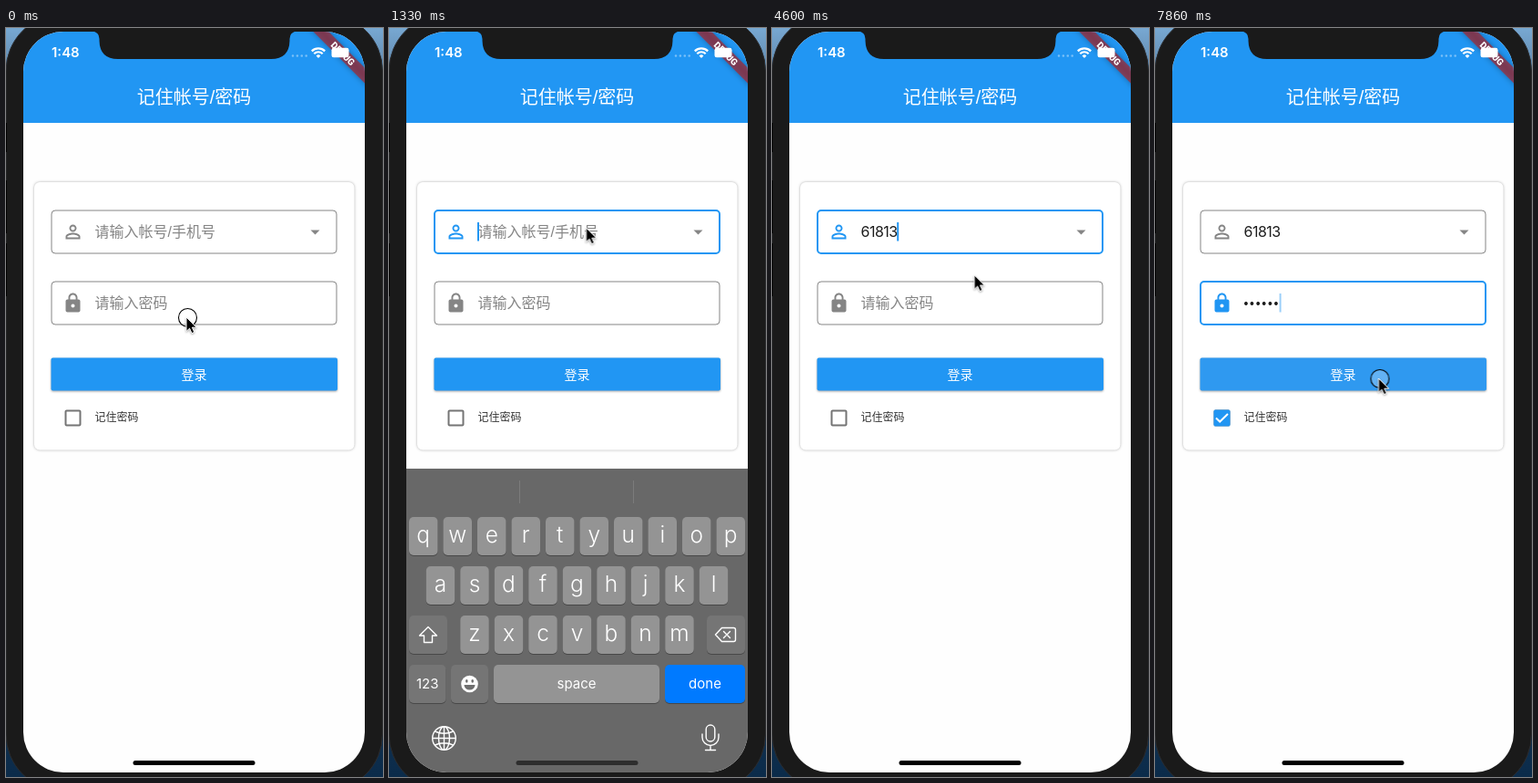
Recreate the animation shown at these times as an HTML page. Size 414 by 821 pixels, loop 8 s.

```html
<!DOCTYPE html>
<html lang="zh-CN">
<head>
<meta charset="utf-8">
<title>Login form</title>
<style>
  html, body { margin: 0; width: 100%; height: 100%; overflow: hidden; background: #1a1a1a; }
  svg { display: block; width: 414px; height: 821px; }
  text { font-family: "Liberation Sans", "Noto Sans CJK SC", "Noto Sans CJK", sans-serif; }
  .latin, .latin text { font-family: Inter, Roboto, sans-serif; }
  .mid { text-anchor: middle; }
  .hint { font-size: 16px; fill: #858585; }
  .typed { font-size: 16px; letter-spacing: -.5px; fill: #1c1c1c; }
  .typed .dots { font-family: "Liberation Sans", sans-serif; font-size: 14px; letter-spacing: 1.7px; }
  .field rect { fill: none; stroke: currentColor; }
  .field path { fill: currentColor; }
  .card { fill: #fff; filter: drop-shadow(0 .5px 1.5px rgba(0, 0, 0, .32)); }
  .button rect { filter: drop-shadow(0 1px 1px rgba(0, 0, 0, .35)); }

  /* The script moves --t; the keyframes hold all poses. */
  .anim { animation: 8s linear infinite paused; animation-delay: var(--t, 0ms); }
  .cut { animation-timing-function: step-end; }
  #pointer { animation-name: pointer; }
  #ring { animation-name: ring; }
  #keyboard { animation-name: keyboard; }
  #bar { animation-name: bar; }
  #account { animation-name: account; }
  #password { animation-name: password; }
  #accountHint { animation-name: accountHint; }
  #passwordHint { animation-name: passwordHint; }
  #caret { animation-name: caret; }
  #tick { animation-name: tick; }
  #login { animation-name: login; }

  @keyframes pointer {
    0%, 1.85% { transform: translate(198px, 317px); }
    5.55% { transform: translate(206px, 262px); }
    9.25%, 16.65% { transform: translate(216.5px, 219px); }
    22.2% { transform: translate(285px, 221px); }
    27.75%, 29.6% { transform: translate(341px, 221px); }
    33.3% { transform: translate(268px, 234px); }
    37%, 53.65% { transform: translate(219.5px, 238px); }
    57.35% { transform: translate(222px, 270px); }
    61.05%, 79.55% { transform: translate(228.5px, 307px); }
    83.25% { transform: translate(160px, 401px); }
    85.1% { transform: translate(92px, 429px); }
    86.95%, 88.8% { transform: translate(75px, 432px); }
    92.5% { transform: translate(190px, 400px); }
    94.35%, 100% { transform: translate(245.5px, 384px); }
  }
  @keyframes ring {
    0% { opacity: 1; }
    1.85% { opacity: 0; }
    11.1% { opacity: 1; }
    14.8% { opacity: 0; }
    62.9% { opacity: 1; }
    64.75% { opacity: 0; }
    86.95% { opacity: 1; }
    88.8% { opacity: 0; }
    98.05%, 100% { opacity: 1; }
  }
  @keyframes keyboard {
    0% { transform: translateY(341px); }
    11.1% { transform: translateY(298px); }
    12.95% { transform: translateY(32px); }
    14.8% { transform: translateY(3px); }
    16.65% { transform: none; }
    44.4%, 100% { transform: translateY(341px); }
  }
  @keyframes bar {
    0% { fill: #000; }
    11.1% { fill: #2e2e2e; }
    44.4%, 100% { fill: #000; }
  }
  @keyframes account {
    0% { color: #858585; stroke-width: 1px; }
    11.1% { color: #2196f3; stroke-width: 2px; }
    62.9%, 100% { color: #858585; stroke-width: 1px; }
  }
  @keyframes password {
    0% { color: #858585; stroke-width: 1px; }
    62.9%, 100% { color: #2196f3; stroke-width: 2px; }
  }
  @keyframes accountHint {
    0% { opacity: 1; }
    46.25% { opacity: .3; }
    48.1%, 100% { opacity: 0; }
  }
  @keyframes passwordHint {
    0% { opacity: 1; }
    68.45% { opacity: .06; }
    70.3%, 100% { opacity: 0; }
  }
  @keyframes caret {
    0% { opacity: 0; }
    11.1% { opacity: 1; }
    22.2% { opacity: 0; }
    27.75% { opacity: 1; }
    35.15% { opacity: 0; }
    40.7% { opacity: 1; }
    59.2% { opacity: 0; }
    62.9% { opacity: 1; }
    85.1% { opacity: 0; }
    90.65% { opacity: 1; }
    98.05%, 100% { opacity: .45; }
  }
  @keyframes tick {
    0% { opacity: 0; }
    88.8%, 100% { opacity: 1; }
  }
  @keyframes login {
    0% { fill: #2196f3; }
    98.05%, 100% { fill: #2f99f0; }
  }
</style>
</head>
<body>
<svg viewBox="0 0 414 821">
  <defs>
    <linearGradient id="desk" x2="0" y2="1">
      <stop offset="0" stop-color="#78a8d2"/>
      <stop offset=".1" stop-color="#4d6f90"/>
      <stop offset="1" stop-color="#0b2b4a"/>
    </linearGradient>
    <clipPath id="screen"><rect x="19" y="4" width="375" height="812" rx="44"/></clipPath>
  </defs>

  <rect width="414" height="821" fill="url(#desk)"/>
  <rect x="0" y="-15" width="413.5" height="851" rx="62" fill="#1a1a1a" stroke="#2b2c2f"/>
  <path d="M0 104v32M0 167v58M0 236v58" stroke="#000" stroke-width="2"/>

  <g clip-path="url(#screen)">
    <rect x="19" y="4" width="375" height="812" fill="#fefefe"/>
    <rect x="19" y="4" width="375" height="100" fill="#2196f3"/>
    <text class="mid" x="206.5" y="83.4" font-size="20" font-weight="500" fill="#fff">记住帐号/密码</text>

    <rect class="card" x="31" y="169" width="351.5" height="293.5" rx="6"/>

    <g id="account" class="field anim cut">
      <rect x="50" y="200" width="313" height="47" rx="4"/>
      <path transform="translate(61.5 211.5)" stroke="none" d="M12 5.9c1.16 0 2.1.94 2.1 2.1s-.94 2.1-2.1 2.1S9.9 9.16 9.9 8s.94-2.1 2.1-2.1m0 9c2.97 0 6.1 1.46 6.1 2.1v1.1H5.9V17c0-.64 3.13-2.1 6.1-2.1M12 4C9.79 4 8 5.79 8 8s1.79 4 4 4 4-1.79 4-4-1.79-4-4-4zm0 9c-2.67 0-8 1.34-8 4v3h16v-3c0-2.66-5.33-4-8-4z"/>
    </g>
    <path d="M334.5 221.5h10l-5 5z" fill="#858585"/>
    <text id="accountHint" class="hint anim cut" x="97.5" y="229">请输入帐号/手机号</text>
    <text id="accountText" class="typed latin" x="97.5" y="228.8"></text>

    <g id="password" class="field anim cut">
      <rect x="50" y="278" width="313" height="47" rx="4"/>
      <path transform="translate(61.5 289.5)" d="M18 8h-1V6c0-2.76-2.24-5-5-5S7 3.24 7 6v2H6c-1.1 0-2 .9-2 2v10c0 1.1.9 2 2 2h12c1.1 0 2-.9 2-2V10c0-1.1-.9-2-2-2zm-6 9c-1.1 0-2-.9-2-2s.9-2 2-2 2 .9 2 2-.9 2-2 2zm3.1-9H8.9V6c0-1.71 1.39-3.1 3.1-3.1s3.1 1.39 3.1 3.1z"/>
    </g>
    <text id="passwordHint" class="hint anim cut" x="97.5" y="307">请输入密码</text>
    <text id="passwordText" class="typed latin" x="97.5" y="306.8"><tspan id="dots" class="dots"></tspan><tspan id="last"></tspan></text>
    <rect id="caret" class="anim cut" width="2" height="20.5" fill="#2196f3"/>

    <g class="button">
      <rect id="login" class="anim cut" x="49.5" y="361.5" width="314.5" height="36" rx="2"/>
      <text class="mid" x="206.5" y="385" font-size="14" font-weight="500" fill="#fff">登录</text>
    </g>
    <rect x="65.5" y="419.5" width="16" height="16" rx="1" fill="none" stroke="#757575" stroke-width="2"/>
    <g id="tick" class="anim cut">
      <rect x="64.5" y="418.5" width="18" height="18" rx="1.5" fill="#2196f3"/>
      <path d="M67 427.5l4.2 4 8.8-8.5" fill="none" stroke="#fff" stroke-width="2"/>
    </g>
    <text x="97.5" y="431" font-size="12" fill="#333">记住密码</text>

    <g transform="translate(394 4) rotate(45)">
      <rect x="-60" y="28" width="120" height="12" fill="#b71c1c" fill-opacity=".627" style="filter:drop-shadow(0 0 3px rgba(0,0,0,.5))"/>
      <text class="latin mid" y="37.6" font-size="10" font-weight="900" fill="#fff" style="font-family:Roboto,sans-serif">DEBUG</text>
    </g>

    <g fill="#fff">
      <text class="latin" x="50" y="32.3" font-size="15" font-weight="600">1:48</text>
      <path d="M315 30.5h16" stroke="#fff" stroke-opacity=".4" stroke-width="2.6" stroke-linecap="round" stroke-dasharray="0 4.9"/>
      <path d="M335.8 25.4a10.2 10.2 0 0 1 14.4 0M338.3 28.2a6.6 6.6 0 0 1 9.4 0" fill="none" stroke="#fff" stroke-width="2.2"/>
      <path d="M340.6 30.4a3.4 3.4 0 0 1 4.8 0L343 33z"/>
      <rect x="357.5" y="21.8" width="19" height="10.5" rx="2.4"/>
    </g>

    <g id="keyboard" class="anim cut latin"></g>
    <rect id="bar" class="anim cut" x="139.5" y="803" width="134" height="5" rx="2.5"/>
  </g>
  <path d="M94 3.5Q102.500 4 102.500 12V14Q103 34 123 34H291Q311 34 311.500 14V12Q311.500 4 320 3.500Z" fill="#1a1a1a"/>

  <g id="pointer" class="anim">
    <circle id="ring" class="anim cut" cx="1.5" cy=".5" r="10" fill="#fff" fill-opacity=".25" stroke="#000" stroke-width="1.1"/>
    <path d="M0 0V15.500L3.600 12.200 6 17.600 8.800 16.400 6.400 11.200H11.200Z" stroke="#fff" style="filter:drop-shadow(0 1px 1px rgba(0,0,0,.35))"/>
  </g>
</svg>

<script>
  const $ = id => document.getElementById(id);
  const LOOP = 8000, STEP = 148.2;
  const ACCOUNT = '61813', ACCOUNT_KEYS = [25, 26, 27, 27, 28];
  const PASSWORD = '183649', PASSWORD_KEYS = [37, 38, 39, 40, 41, 42];
  const FOCUS_PASSWORD = 34, MASK_LAST = 53;

  // On-screen keyboard
  const key = (x, y, w, fill, label = '', size = 15, base = 26) =>
    `<rect x="${x}" y="${y + 1}" width="${w}" height="42" rx="5" fill="#484848"/>` +
    `<rect x="${x}" y="${y}" width="${w}" height="42" rx="5" fill="${fill}"/>` +
    `<text class="mid" x="${x + w / 2}" y="${y + base}" font-size="${size}" fill="#fff"` +
    ` font-weight="${size > 20 ? 300 : 400}">${label}</text>`;

  const row = (letters, x, y) =>
    [...letters].map((c, i) => key(x + i * 37.5, y, 31.5, '#949494', c, 24.5, 27.5)).join('');

  const KEY_ICONS = `
    <g fill="none" stroke="#fff" stroke-width="1.4" stroke-linejoin="round" stroke-linecap="round">
      <path d="M43 653.500l9.500 9.500h-5v7.500h-9v-7.500h-5z"/>
      <path d="M365.500 654.500h13q2 0 2 2v11q0 2-2 2h-13l-7-7.500zM367.500 658.500l7 7m0-7l-7 7"/>
      <circle cx="60.500" cy="775.500" r="12.800"/>
      <ellipse cx="60.500" cy="775.500" rx="6" ry="12.800"/>
      <path d="M60.500 762.700v25.600M47.700 775.500h25.600M50.500 768q10 4.500 20 0M50.500 783q10-4.500 20 0"/>
      <rect x="348.200" y="761" width="9.600" height="18" rx="4.800"/>
      <path d="M344 771v3.500a9 9 0 0 0 18 0V771M353 783.500v5M347.500 788.500h11"/>
    </g>
    <circle cx="88.500" cy="716" r="9.300" fill="#fff"/>
    <g fill="#6f6f6f">
      <ellipse cx="85.300" cy="712.800" rx="1.300" ry="1.900"/>
      <ellipse cx="91.700" cy="712.800" rx="1.300" ry="1.900"/>
      <path d="M82.500 717h12a6 5.500 0 0 1-12 0z"/>
    </g>`;

  $('keyboard').innerHTML =
    '<rect x="19" y="480" width="375" height="341" fill="#686868"/>' +
    '<path d="M143.500 493v25M268.500 493v25" stroke="#7c7c7c"/>' +
    row('qwertyuiop', 22, 533) + row('asdfghjkl', 40.75, 587) + row('zxcvbnm', 78.25, 641) +
    key(22, 641, 42, '#757575') + key(349, 641, 42, '#757575') +
    key(22, 695, 40.5, '#757575', '123') + key(68, 695, 41, '#757575') +
    key(115, 695, 182, '#949494', 'space', 15, 25.5) +
    key(303, 695, 88, '#007aff', 'done', 15, 25.5) + KEY_ICONS;

  const typedCount = (keys, frame) => keys.filter(k => k <= frame).length;

  function draw(frame) {
    document.documentElement.style.setProperty('--t', `${-frame * STEP}ms`);

    $('accountText').textContent = ACCOUNT.slice(0, typedCount(ACCOUNT_KEYS, frame));
    const n = typedCount(PASSWORD_KEYS, frame);
    const masked = frame >= MASK_LAST ? n : Math.max(0, n - 1);
    $('dots').textContent = '•'.repeat(masked);
    $('last').textContent = PASSWORD.slice(masked, n);

    const inPassword = frame >= FOCUS_PASSWORD;
    const active = $(inPassword ? 'passwordText' : 'accountText');
    const width = active.textContent ? active.getComputedTextLength() : 0;
    $('caret').setAttribute('x', 97 + width);
    $('caret').setAttribute('y', inPassword ? 291 : 213);
  }

  const start = performance.now();
  let shown = -1;
  function loop() {
    const frame = Math.floor((performance.now() - start) % LOOP / STEP);
    if (frame !== shown) draw(shown = frame);
    requestAnimationFrame(loop);
  }
  loop();
</script>
</body>
</html>
```
